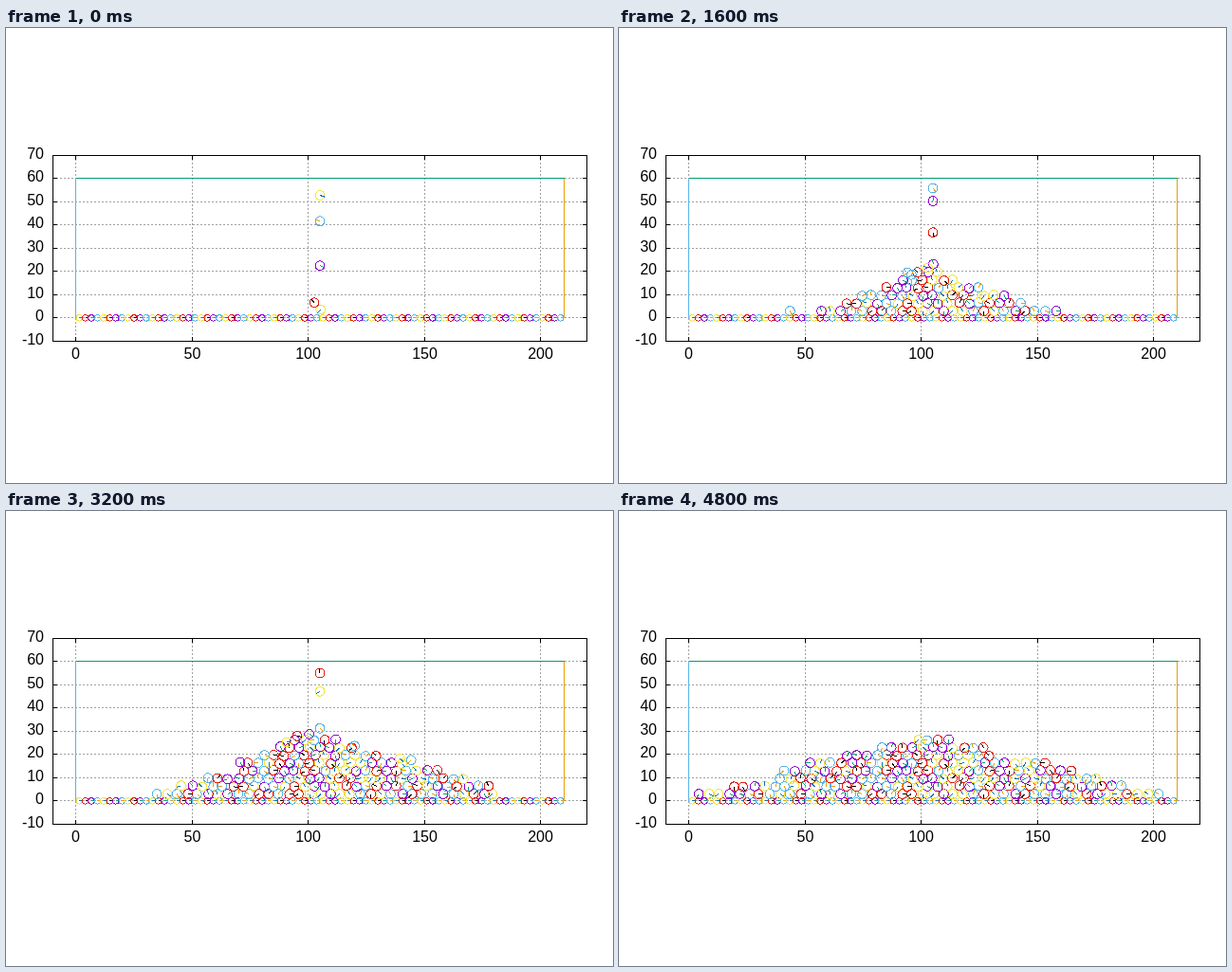
Animation of 640 by 480 pixels, one loop 4.9 s. Source, as an HTML page:

```html
<!DOCTYPE html>
<html lang="en">
<head>
<meta charset="utf-8">
<title>Granular heap</title>
<style>
  html, body { margin: 0; width: 100%; height: 100%; overflow: hidden; background: #fff; }
  svg { display: block; width: 640px; height: 480px; }
  text { font: 16px "Liberation Sans", Arial, sans-serif; }
</style>
</head>
<body>
<svg id="stage" viewBox="0 0 640 480" fill="none" shape-rendering="crispEdges"></svg>
<script>
const stage = document.getElementById('stage');
const FRAME_MS = 100, FRAMES = 49;
const COUNT = 200, RATE = 4.8935;       // grains, grains released per frame
const DROP_X = 105, DROP_Y = 56;
const RIMS = ['#f0e442', '#e51e10', '#9400d3', '#56b4e9'];
const SPOKES = ['#0072b2', '#000', '#009e73', '#e69f00'];

// Heap stages: frame, settled grains, then the [left, right] extent of each row.
const STAGES = [
  { at: 11, settled: 55, rows: [[64, 150], [75, 140], [79, 126], [90, 115]] },
  { at: 16, settled: 79, rows: [[55, 158], [68, 143], [74, 138], [84, 124], [91, 114], [95, 105], [106, 106]] },
  { at: 25, settled: 123, rows: [[39, 160], [47, 147], [58, 141], [72, 130], [80, 134], [80, 127], [95, 117], [96, 113]] },
  { at: 32, settled: 159, rows: [[36, 179], [44, 177], [55, 169], [70, 156], [70, 150], [78, 131], [84, 123], [86, 115]] },
  { at: 40, settled: 197, rows: [[17, 202], [19, 188], [30, 178], [37, 166], [49, 154], [65, 132], [93, 126], [99, 115], [103, 105]] },
  { at: 48, settled: 200, rows: [[3, 202], [20, 188], [40, 178], [42, 168], [49, 154], [65, 132], [82, 126], [97, 115]] }
];
const PEAKS = [[-1, 3], [-0.8, 7], [11, 16], [16, 23], [25, 27], [32, 30], [40, 30], [48, 28]];

const px = x => 73.98 + 2.4478 * x;
const py = y => 305.9 - 2.45 * y;
const crisp = v => Math.floor(v) + 0.5;
const lerp = (a, b, t) => a + (b - a) * t;
const clamp01 = t => Math.max(0, Math.min(1, t));

let seed = 4711;
function random() {
  seed = (seed + 0x6D2B79F5) | 0;
  let t = Math.imul(seed ^ (seed >>> 15), 1 | seed);
  t = (t + Math.imul(t ^ (t >>> 7), 61 | t)) ^ t;
  return ((t ^ (t >>> 14)) >>> 0) / 4294967296;
}

function add(parent, tag, attrs = {}) {
  const node = document.createElementNS('http://www.w3.org/2000/svg', tag);
  for (const key in attrs) node.setAttribute(key, attrs[key]);
  return parent.appendChild(node);
}

function line(x1, y1, x2, y2, stroke, dash = 'none') {
  add(stage, 'line', { x1, y1, x2, y2, stroke, 'stroke-dasharray': dash });
}

function label(x, y, anchor, value) {
  add(stage, 'text', { x, y, 'text-anchor': anchor, fill: '#000' }).textContent = value;
}

function drawPlot() {
  const [left, right, top, bottom] = [49, 613, 134, 331];
  for (let v = -10; v <= 70; v += 10) {
    const y = crisp(py(v) - 0.35);
    if (v > -10 && v < 70) line(left, y, right, y, '#a0a0a0', '2 2');
    line(left, y, left + 5, y, '#000');
    line(right - 5, y, right, y, '#000');
    label(40, y + 3.5, 'end', v);
  }
  for (let v = 0; v <= 200; v += 50) {
    const x = crisp(px(v));
    line(x, top, x, bottom, '#a0a0a0', '2 2');
    line(x, top, x, top + 5, '#000');
    line(x, bottom - 5, x, bottom, '#000');
    label(x, 349, 'middle', v);
  }
  add(stage, 'rect', {
    x: left + 0.5, y: top + 0.5, width: right - left - 1, height: bottom - top - 1, stroke: '#000'
  });
  const [x0, x1, y0, y1] = [73.5, 588.5, 305.5, 158.5];
  line(x0, y1, x1, y1, '#009e73');
  line(x0, y0, x0, y1, '#56b4e9');
  line(x1, y1, x1, y0, '#e69f00');
}

function makeGrain(index, radius) {
  const node = add(stage, 'g');
  add(node, 'circle', { r: radius, stroke: RIMS[index % 4] });
  add(node, 'line', { x2: radius, stroke: SPOKES[index % 4] });
  return node;
}

function place(node, x, y, angle) {
  node.setAttribute('transform',
    `translate(${px(x).toFixed(2)} ${py(y).toFixed(2)}) rotate(${angle.toFixed(1)})`);
}

function peakAt(frame) {
  const i = Math.max(1, PEAKS.findIndex(p => p[0] >= frame));
  const [[t0, h0], [t1, h1]] = [PEAKS[i - 1], PEAKS[i]];
  return lerp(h0, h1, clamp01((frame - t0) / (t1 - t0)));
}

// Loose hexagonal packing of every place a grain may rest.
function makeSites() {
  const sites = [], gap = 4.4;
  for (let row = 0; row < 9; row++) {
    for (let j = -24; j <= 24; j++) {
      const base = DROP_X + gap * (j + (row % 2) / 2);
      if (base < 2 || base > 207) continue;
      sites.push({
        row,
        x: base + (random() - 0.5) * 0.9,
        y: 3 + 3.32 * row + (row ? (random() - 0.5) * 0.6 : 0),
        stray: row === 0 && (j === -14 || j === -11),
        order: row + random() * 1.2 + Math.abs(base - DROP_X) / 50
      });
    }
  }
  return sites;
}

function makeGrains() {
  return Array.from({ length: COUNT }, (_, i) => {
    const born = i / RATE - 1;
    const height = peakAt(born + 0.1);
    return {
      node: makeGrain(80 + i, 4.9),
      born, height,
      impact: born + Math.sqrt((DROP_Y - height) / 4) / RATE,
      angle: random() * 360,
      moves: []
    };
  });
}

function roll(grain, site, earliest, speed) {
  const last = grain.moves[grain.moves.length - 1];
  const from = last ? last.to : { x: DROP_X, y: grain.height };
  const start = last ? Math.max(earliest, last.end) : earliest;
  const end = start + 0.5 + Math.hypot(site.x - from.x, site.y - from.y) / speed;
  grain.moves.push({ from, to: site, start, end });
  site.grain = grain;
}

function planMoves(sites, grains) {
  let next = 0, before = 0;
  for (const { at, settled, rows } of STAGES) {
    const outside = s => {
      if (s.stray) return -999;
      const extent = rows[s.row];
      return extent ? Math.max(extent[0] - s.x, s.x - extent[1]) : 999;
    };
    const ranked = [...sites].sort((a, b) => outside(a) - outside(b));
    const loose = ranked.slice(settled).filter(s => s.grain);
    const open = ranked.slice(0, settled).filter(s => !s.grain).sort((a, b) => a.order - b.order);
    for (const site of loose) {
      const { grain } = site;
      site.grain = null;
      const distance = s => Math.hypot(s.x - site.x, s.y - site.y);
      const target = open.reduce((best, s) => distance(s) < distance(best) ? s : best);
      open.splice(open.indexOf(target), 1);
      roll(grain, target, lerp(before, at, random() * 0.45), 18);
    }
    for (const site of open) {
      const grain = grains[next++];
      roll(grain, site, grain.impact, 24);
    }
    before = at;
  }
}

function pose(grain, frame) {
  if (frame < grain.impact) {
    const fall = (frame - grain.born) * RATE;
    return [DROP_X, DROP_Y - 4 * fall * fall, grain.angle];
  }
  let x = DROP_X, y = grain.height, angle = grain.angle;
  for (const { from, to, start, end } of grain.moves) {
    if (frame < start) break;
    const u = clamp01((frame - start) / (end - start));
    const eased = u * (2 - u);
    x = lerp(from.x, to.x, eased);
    y = lerp(from.y, to.y, eased);
    angle += (x - from.x) * 14;
  }
  return [x, y, angle];
}

drawPlot();
for (let i = 0; i < 80; i++) place(makeGrain(i, 3.2), 2.625 * (i + 0.5), 0, 0);
const grains = makeGrains();
planMoves(makeSites(), grains);

function render(ms) {
  const frame = Math.floor(ms / FRAME_MS) % FRAMES;
  for (const grain of grains) {
    const visible = frame >= grain.born;
    grain.node.setAttribute('visibility', visible ? 'visible' : 'hidden');
    if (visible) place(grain.node, ...pose(grain, frame));
  }
}

const begin = performance.now();
function tick() {
  render(performance.now() - begin);
  requestAnimationFrame(tick);
}
tick();
</script>
</body>
</html>
```
